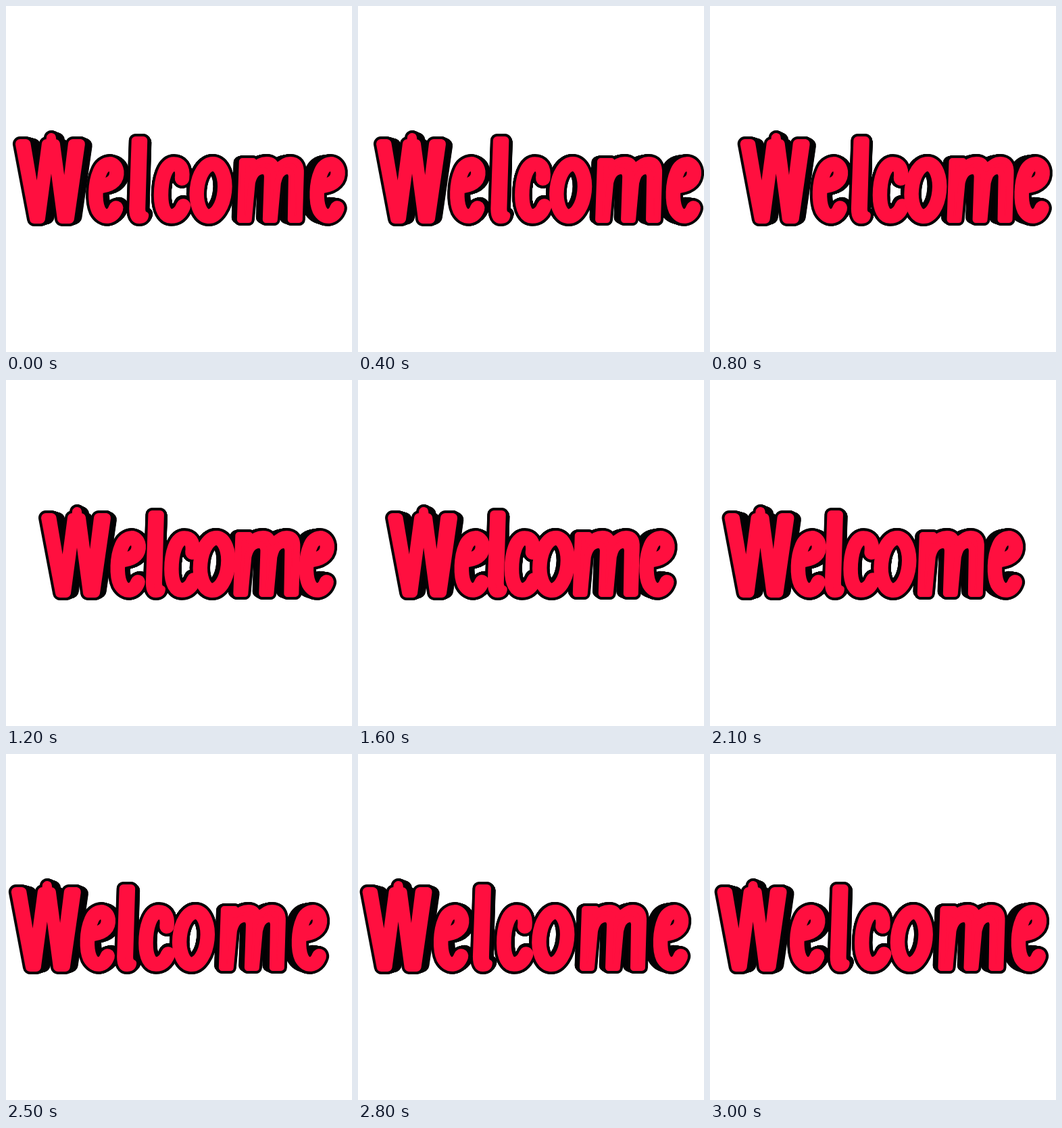
An HTML page with a canvas for the animation above (3100 ms loop, 512x512 px).

```html
<!DOCTYPE html>
<html lang="en">
<head>
<meta charset="utf-8">
<title>Welcome</title>
<style>
  html, body { margin: 0; height: 100%; overflow: hidden; background: #fff; }
  canvas { display: block; width: 100vmin; height: 100vmin; }
</style>
</head>
<body>
<canvas id="stage" width="512" height="512" role="img" aria-label="Welcome"></canvas>
<script>
const ctx = document.getElementById('stage').getContext('2d');
const RED = '#ff0f3f', BLACK = '#040305';
const OUTLINE = 4, DEPTH = 0.05, LAYERS = 14, CENTER = 256;
const SWAY = 23, FIRST_PHASE = -41, PHASE_STEP = 14.5;

const E = 'M143 266C158 264 165 256 164 245C162 230 145 230 139 246' +
          'C132 262 131 289 137 302C144 315 158 314 163 299';

// Solid letters are filled with rounded corners, the others are plain strokes.
const letter = (x, width, path, solid = false) => ({ x, width, path: new Path2D(path), solid });
const letters = [
  letter(15, 14, 'M21 204L42 315H51L67 195L83 315H94L110 204H99L86.5 305L73 204H60L46.5 305L29.5 204Z', true),
  letter(10, 21.5, E),
  letter(5, 12, 'M191.5 199H203L200 300Q200 308 205 310Q204 316 197 316Q188 316 188 300Z', true),
  letter(2.5, 21.5, 'M257 255C259 238 252 234 245 234C233 234 226 256 226 280' +
                    'C226 302 233 311 241 311C249 311 255 306 259 296'),
  letter(-6.7, 21.5, 'M307 233.7A20.5 39 6 0 1 299 311.3A20.5 39 6 0 1 307 233.7Z'),
  letter(-12.2, 10, 'M350 230L347 316H359L364 262Q368 244 380 244Q388 244 387 256L385 316H397' +
                    'L402 262Q406 244 416 244Q424 244 423 256L422 316H434L436 248Q437 228 421 228' +
                    'Q410 228 400 240Q398 228 386 228Q374 228 366 238V230Z', true),
  letter(310.5, 21.5, E),
];

function drawWord(angle, scale, color, grow) {
  ctx.fillStyle = ctx.strokeStyle = color;
  const shift = CENTER * (1 - scale);
  letters.forEach(({ x, width, path, solid }, i) => {
    const phase = (angle + FIRST_PHASE + i * PHASE_STEP) * Math.PI / 180;
    ctx.setTransform(scale, 0, 0, scale, shift, shift);
    ctx.translate(x + SWAY * Math.sin(phase), 0);
    ctx.lineWidth = width + 2 * grow;
    if (solid) ctx.fill(path);
    ctx.stroke(path);
  });
}

function render() {
  const time = performance.now() % 3100;
  const step = Math.max(0, Math.floor(time / 100) - 1);
  const angle = step * 12;
  ctx.resetTransform();
  ctx.fillStyle = '#fff';
  ctx.fillRect(0, 0, 512, 512);
  ctx.lineCap = ctx.lineJoin = 'round';
  for (let i = LAYERS; i >= 0; i--) drawWord(angle, 1 - DEPTH * i / LAYERS, BLACK, OUTLINE);
  drawWord(angle, 1, RED, 0);
  requestAnimationFrame(render);
}
render();
</script>
</body>
</html>
```
